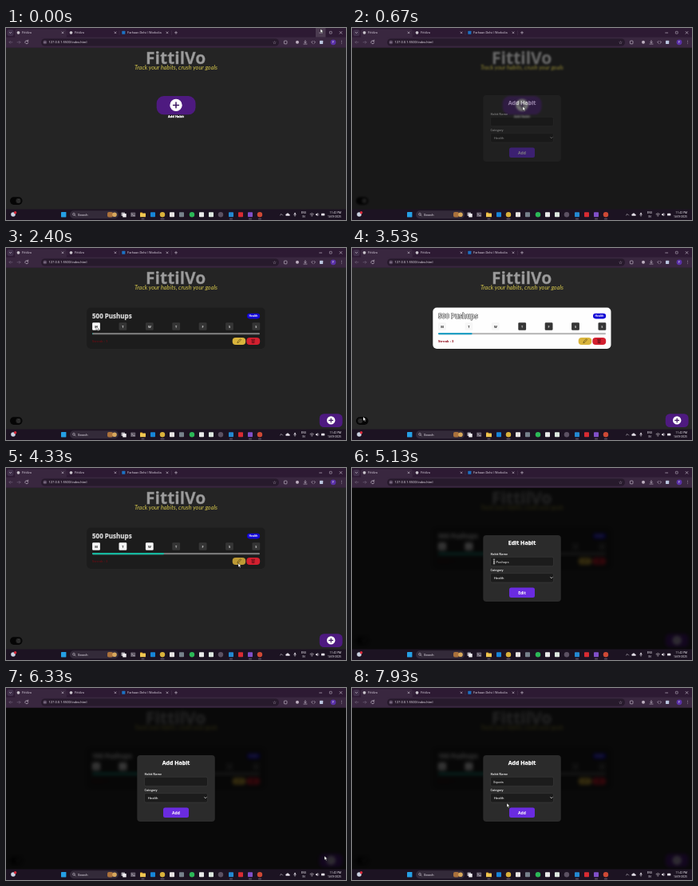
An HTML page that plays this animation: 426x240 px, repeating every 8 s.

```html
<!DOCTYPE html>
<html lang="en">
<head>
<meta charset="utf-8">
<title>Habit tracker</title>
<style>
  html, body { margin: 0; width: 100%; height: 100%; overflow: hidden; background: #242424; }
  svg { display: block; width: 100vw; height: 100vh; font-family: Roboto, "Liberation Sans", sans-serif; }
  .display { font-family: "Noto Sans", "Open Sans", sans-serif; font-weight: 900; }
  .label { font-family: "Open Sans", sans-serif; font-weight: 700; }
  .script { font-family: Lato, sans-serif; font-style: italic; }
  .line { fill: none; stroke-linecap: round; stroke-linejoin: round; }
  .mid { text-anchor: middle; }
  .heavy { stroke: #fff; stroke-width: .25px; }
</style>
</head>
<body>
<svg id="stage" viewBox="0 0 426 240" preserveAspectRatio="none"></svg>
<script>
const LOOP = 8000;
const rect = (x, y, w, h, fill, r = 0, more = '') =>
  `<rect x="${x}" y="${y}" width="${w}" height="${h}" rx="${r}" fill="${fill}" ${more}/>`;
const dot = (x, y, r, fill, more = '') => `<circle cx="${x}" cy="${y}" r="${r}" fill="${fill}" ${more}/>`;
const text = (x, y, size, fill, str, more = '') =>
  `<text x="${x}" y="${y}" font-size="${size}" fill="${fill}" ${more}>${str}</text>`;
const line = (d, color, w = 0.6, more = '') =>
  `<path class="line" d="${d}" stroke="${color}" stroke-width="${w}" ${more}/>`;
const group = (id, body, more = '') => `<g id="${id}" ${more}>${body}</g>`;
const plus = (x, y, s, color, w) => line(`M${x - s} ${y}h${2 * s}M${x} ${y - s}v${2 * s}`, color, w);
const cross = (x, y, s, color) => line(`M${x - s} ${y - s}l${2 * s} ${2 * s}M${x + s} ${y - s}l${-2 * s} ${2 * s}`, color);

function browser() {
  const pale = '#d3c9d8';
  const tab = (x, label, icon) => icon + text(x, 7.3, 4, pale, label);
  return rect(0, 0, 426, 24.5, '#2d1a33') +
    rect(0, 11.5, 426, 13, '#39273f') +
    rect(1.5, 2, 8, 8, '#40304a', 2) + line('M4.3 5.3l1.2 1.3l1.2-1.3', pale) +
    rect(11, 1.5, 65, 11, '#39273f', 2.5) +
    tab(20, 'Fittilvo', dot(15.5, 5.8, 1.9, '#c9c3cb')) + cross(71, 5.8, 1, pale) +
    tab(86, 'Fittilvo', dot(81.5, 5.8, 1.9, '#c9c3cb')) + cross(137, 5.8, 1, pale) +
    tab(152, 'Farhaan Delvi | Workolia', rect(145.3, 3.8, 4, 4, '#1b72c4', 0.4)) + cross(202, 5.8, 1, pale) +
    line('M77.5 3.5v5M142 3.5v5M207.5 3.5v5', '#4e3d57', 0.4) +
    plus(213, 5.8, 1.5, pale, 0.6) +
    group('minimize', rect(388, 0, 12.5, 11.5, '#4b3b50')) +
    line('M392.7 6h3', pale) + rect(405.4, 4.3, 2.8, 2.8, 'none', 0.3, `stroke="${pale}" stroke-width=".5"`) +
    cross(419.5, 5.8, 1.4, pale) +
    line('M8 17.8h-4m1.5-1.5l-1.5 1.5l1.5 1.5M14 17.8h4m-1.5-1.5l1.5 1.5l-1.5 1.5', '#75667c') +
    line('M27.4 16.4a2 2 0 1 0 .4 1.8M27.7 15v1.6h-1.6', pale) +
    rect(44, 13.2, 298, 9.4, '#271a2c', 4.7) + dot(48.8, 17.8, 2.6, '#403047') +
    line('M47.5 17h2.6M47.5 18.6h2.6', pale, 0.5) +
    text(53.5, 19.3, 4.1, '#ddd6e1', '127.0.0.1:5500/index.html') +
    text(336.5, 19.7, 5.5, pale, '☆', 'class="mid" font-family="DejaVu Sans, sans-serif"') +
    rect(348.4, 16, 3.6, 3.8, 'none', 0.6, `stroke="${pale}" stroke-width=".6"`) +
    dot(365, 17.8, 2, '#bcaebf') +
    line('M375 15.5v3m-1.3-1.2l1.3 1.3l1.3-1.3M373 20h4', pale) +
    line('M384.2 16.3l-1.5 1.5l1.5 1.5M386 16.3l1.5 1.5l-1.5 1.5', pale) +
    rect(393, 15.7, 4.2, 4.2, '#b9c5de', 0.6) +
    dot(410, 17.8, 3.4, '#5a31a8') + text(410, 19.1, 3.6, '#fff', 'F', 'class="mid"') +
    dot(420.5, 16, 0.45, pale) + dot(420.5, 17.8, 0.45, pale) + dot(420.5, 19.6, 0.45, pale);
}

function taskbar() {
  const pale = '#e4dfe8';
  // shape, x, colour of each pinned app
  const apps = [
    ['s', 184, '#1685d8'], ['c', 196, '#d9b13b'], ['s', 208, '#e8e3e3'], ['s', 220, '#77818c'],
    ['c', 233, '#2cb858'], ['s', 245, '#e9e9e9'], ['s', 257, '#dce8df'], ['c', 269, '#5b5162'],
    ['s', 282, '#2389d2'], ['s', 294, '#d92b32'], ['s', 306, '#8150c9'], ['c', 318, '#cf4935']
  ];
  return rect(0, 226.5, 426, 13.5, '#1c1322') +
    dot(9, 233, 2.8, '#ccd4e4') + dot(11.6, 230.8, 1.7, '#d8293b') +
    rect(69, 230, 6.4, 6.4, '#25a0e5', 0.4) +
    rect(80, 228.3, 61, 10, '#332a39', 5) + dot(85, 232.8, 1.4, 'none', `stroke="${pale}" stroke-width=".5"`) +
    line('M86 233.8l1.2 1.2', pale, 0.5) + text(90, 234.8, 4.1, pale, 'Search') +
    rect(127, 230, 7, 6.5, '#aa713c', 2) + dot(136, 233.2, 2.8, '#d7a85d') +
    rect(144.5, 230.5, 4.5, 4.5, '#a9a5ad', 0.5) + rect(146.2, 232, 4.5, 4.5, '#efedf0', 0.5) +
    rect(156.2, 230.5, 6, 5.6, '#625a68', 0.7) + line('M157.4 232l1.2 1l-1.2 1M159.4 234.6h1.8', pale, 0.5) +
    rect(168, 230.5, 3, 2, '#d99a25', 0.5) + rect(168, 231.5, 7, 4.8, '#f0c651', 0.6) +
    apps.map(([shape, x, color]) => shape === 'c'
      ? dot(x, 233.2, 3.2, color) : rect(x - 3, 230.2, 6, 6, color, 0.8)).join('') +
    line('M170 238.7h3M194 238.7h4M280.5 238.7h3M304.5 238.7h3M316.5 238.7h3', '#a997b5', 0.6) +
    line('M343.5 234l1.5-1.5l1.5 1.5', pale) +
    `<path d="M351 234.8a1.2 1.2 0 0 1 .3-2.3a1.8 1.8 0 0 1 3.3.3a1 1 0 0 1 .3 2z" fill="${pale}"/>` +
    rect(361.3, 230.7, 1.5, 3, pale, 0.7) + line('M360.5 233a1.5 1.5 0 0 0 3 0M362 234.6v1', pale, 0.4) +
    text(373, 232.1, 3.3, pale, 'ENG', 'class="mid"') + text(373, 236.6, 3.3, pale, 'IN', 'class="mid"') +
    line('M381 232.5q2.2-2 4.4 0M382 233.8q1.2-1 2.4 0', pale) + dot(383.2, 235, 0.5, pale) +
    `<path d="M388 232.4h1l1.5-1.3v4.2l-1.5-1.3h-1z" fill="${pale}"/>` + line('M391.5 232q1 1.2 0 2.4', pale, 0.4) +
    rect(395, 231.8, 4.3, 2.8, pale, 0.6) +
    text(420, 232.1, 3.4, pale, '11:42 PM', 'text-anchor="end"') +
    text(420, 236.8, 3.4, pale, '14-09-2025', 'text-anchor="end"');
}

const dayX = i => 113 + i * 33.4;

function card() {
  const days = [...'MTWTFSS'].map((d, i) =>
    rect(dayX(i) - 4.9, 93.3, 9.8, 9.4, '#353535', 1.3, `id="day${i}"`) +
    text(dayX(i), 99.5, 3.9, '#ddd', d, `id="letter${i}" class="display mid"`)).join('');
  return rect(101.3, 74.6, 223.2, 51.4, '#1c1c1c', 5, 'id="cardBack"') +
    text(108, 88.1, 8, '#e2e2e2', '', 'id="habit" class="display" stroke="#444" stroke-width=".9" paint-order="stroke"') +
    rect(302, 81.8, 16.2, 6.6, '#1206d6', 3.3) + text(310, 86.3, 3.3, '#fff', 'Health', 'class="display mid"') +
    days + rect(108, 106.1, 210, 2.2, '#777', 1.1, 'id="track"') + rect(108, 106.1, 0, 2.2, '#16b79f', 1.1, 'id="progress"') +
    text(108, 118, 4.2, '#5a1015', '', 'id="streak" class="display"') +
    rect(283.7, 112, 16.5, 9, '#d9b43c', 4, 'id="editButton"') + line('M290 118.3l.5-1.6l3-3l1.1 1.1l-3 3z', '#47360c') +
    rect(301.3, 112, 16.9, 9, '#d3202f', 4) + line('M307.6 114.3h4M308.2 115v3.6h2.8v-3.6M309.6 115.5v2.4', '#420910');
}

function page() {
  return rect(-10, 20, 446, 215, '#242424', 0, 'id="pageBack"') +
    text(212.7, 44.6, 21, '#9c9c9c', 'FittilVo', 'id="heading" class="display mid" stroke="#777" stroke-width=".35"') +
    text(213, 51.7, 7.35, '#d5c64b', 'Track your habits, crush your goals', 'id="tagline" class="script mid"') +
    group('starter', rect(188.7, 85, 48.8, 23.3, '#4e1a80', 9) + dot(213, 96.4, 7.7, '#fff') +
      plus(213, 96.4, 3.4, '#3a1560', 1.5) + text(213, 112.4, 4, '#fff', 'Add Habit', 'class="display heavy mid"')) +
    group('card', card() + rect(392.8, 207.2, 28.8, 16.8, '#4e1a80', 5.5) + dot(407.2, 215.4, 5.2, '#fff') +
      plus(407.2, 215.4, 2.4, '#3a1560', 1.2)) +
    rect(5, 211.3, 15.5, 9.6, '#050505', 4.8) +
    group('knob', dot(0, 216, 3.2, '#222') + line('M.8 214.3a1.8 1.8 0 1 0 1 2.6a1.8 1.8 0 0 1-1-2.6', '#555', 0.4));
}

function dialog() {
  return rect(164.3, 84, 97.5, 83, '#2b2b2b', 4) +
    text(213, 96.4, 7, '#fff', '', 'id="dialogTitle" class="display heavy mid"') +
    text(173.5, 108.5, 3.6, '#ddd', 'Habit Name', 'class="label"') +
    rect(173.5, 111.3, 79, 11.4, '#1c1c1c', 2, 'id="field" stroke="#414141" stroke-width=".5"') +
    text(177, 118.5, 4.2, '#eee', '', 'id="fieldText"') +
    text(173.5, 128.5, 3.6, '#ddd', 'Category', 'class="label"') +
    rect(173.5, 131.6, 79, 11.4, '#1c1c1c', 2, 'stroke="#414141" stroke-width=".5"') +
    text(177.7, 138.9, 4.4, '#fff', 'Health') + line('M248.7 136.6l1.2 1.2l1.2-1.2', '#fff', 0.7) +
    rect(197, 149.6, 32, 12.4, '#6a2be0', 2.5) + text(213, 157.6, 5, '#fff', '', 'id="submit" class="label mid"') +
    group('suggestion', rect(202, 125.8, 41.5, 11.4, '#232326', 1.2) +
      rect(202, 128, 41.5, 7, '#303034') + text(204.5, 132.8, 3.7, '#eee', '500 Pushups') + cross(238.5, 131.4, 0.8, '#bbb'));
}

document.getElementById('stage').innerHTML =
  group('page', page()) + rect(0, 24, 426, 203, '#000', 0, 'id="shade"') + group('dialog', dialog()) +
  browser() + taskbar() +
  group('pointer', group('arrow', '<path d="M0 0v5l1.2-1.1l.9 1.9l.9-.4l-.9-1.8h1.6z" fill="#fff" stroke="#000" stroke-width=".35"/>') +
    group('beam', line('M-.8-2.8h1.6M0-2.8v5.6M-.8 2.8h1.6', '#eee', 0.6)));

const $ = id => document.getElementById(id);
const set = (id, attrs) => Object.entries(attrs).forEach(([k, v]) => $(id).setAttribute(k, v));
const show = (id, on) => set(id, { visibility: on ? 'visible' : 'hidden' });
const write = (id, str) => { if ($(id).textContent !== str) $(id).textContent = str; };
const ramp = (t, start, length) => Math.min(1, Math.max(0, (t - start) / length));
const ease = p => p * p * (3 - 2 * p);
const between = (t, a, b) => t >= a && t < b;
const gray = (a, b, p) => { const v = Math.round(a + (b - a) * p); return `rgb(${v},${v},${v})`; };

const ADDED = 2200, LIGHT = 3200, DARK = 3460;
const CHECKS = [2390, 2590, 2790];
const DIALOGS = [[640, 2180], [4400, 5800], [6260, 9000]];
const PATH = [
  [0, 394, 1], [130, 394, 2], [500, 214, 98], [660, 214, 98], [950, 206, 117], [1250, 206, 117],
  [1600, 220, 134], [1780, 220, 134], [2050, 213, 156], [2190, 213, 156], [2350, 113, 98],
  [2420, 113, 98], [2540, 146, 98], [2610, 146, 98], [2740, 180, 98], [2820, 180, 98],
  [3130, 14, 212], [3560, 14, 211], [4180, 291, 119], [4420, 291, 119], [4750, 178, 117],
  [5350, 178, 117], [5650, 213, 156], [5810, 213, 156], [6180, 398, 210], [6350, 399, 210],
  [6700, 206, 117], [7500, 206, 117], [7850, 194, 144], [8000, 194, 144]
];

function pointerAt(t) {
  const i = PATH.findIndex(p => p[0] > t);
  const [a, b] = [PATH[i - 1], PATH[i]];
  const p = ease((t - a[0]) / (b[0] - a[0]));
  return [a[1] + (b[1] - a[1]) * p, a[2] + (b[2] - a[2]) * p];
}

function fieldAt(t) {
  if (t < 4000) return t < 1500 ? '' : '500 Pushups';
  if (t < 6100) {
    const lead = t < 4950 ? '500' : t < 5070 ? '50' : t < 5230 ? '0' : t < 5330 ? '10' : '100';
    return lead + ' Pushups';
  }
  return 'Squats'.slice(0, Math.max(0, Math.floor((t - 6800) / 110)));
}

function draw(t) {
  const light = between(t, LIGHT, DARK);
  const lightCard = between(t, LIGHT, 3620);
  set('pageBack', { fill: t < DARK ? (light ? '#f1f1f1' : '#242424') : gray(241, 36, ramp(t, DARK, 72)) });
  set('tagline', { fill: light ? '#9a8a20' : '#d5c64b' });
  show('minimize', t < 180);
  show('starter', t < ADDED);
  show('card', t >= ADDED);

  const knob = t < DARK ? ramp(t, LIGHT, 80) : 1 - ramp(t, 3540, 90);
  set('knob', { transform: `translate(${15.5 - 5.2 * knob} 0)` });
  const cardFill = light ? '#fff' : t < DARK ? '#1c1c1c' : gray(255, 28, ramp(t, 3530, 170));
  set('cardBack', { fill: cardFill });
  set('streak', { fill: lightCard ? '#8b0010' : '#5a1015' });
  set('track', { fill: lightCard ? '#bbb' : '#777' });
  set('progress', { fill: lightCard ? '#22a0c4' : '#16b79f' });
  set('editButton', { fill: between(t, 4120, 4500) ? '#bd9a35' : '#d9b43c' });

  let done = CHECKS.reduce((sum, c) => sum + ease(ramp(t, c, 130)), 0);
  if (t > DARK) done *= ramp(t, DARK, 150);
  set('progress', { width: done * 30 });
  const count = CHECKS.filter(c => t >= c).length;
  CHECKS.forEach((c, i) => {
    set('day' + i, { fill: t >= c ? '#f6f6f6' : '#353535' });
    set('letter' + i, { fill: t >= c ? '#222' : '#ddd' });
  });
  write('streak', 'Streak : ' + count);
  write('habit', t < 5800 ? '500 Pushups' : '100 Pushups');

  const open = Math.max(...DIALOGS.map(([a, b]) => Math.min(ramp(t, a, 70), 1 - ramp(t, b, 70))));
  show('shade', open > 0);
  show('dialog', open > 0);
  set('shade', { opacity: 0.76 * open });
  set('dialog', { opacity: open });
  $('page').style.filter = open ? `blur(${2 * open}px)` : 'none';

  const verb = between(t, 4300, 6100) ? 'Edit' : 'Add';
  const preview = between(t, 1500, 1780);
  write('dialogTitle', verb + ' Habit');
  write('submit', verb);
  write('fieldText', fieldAt(t));
  set('field', { fill: preview ? '#c3d2df' : '#1c1c1c' });
  set('fieldText', { fill: preview ? '#333' : '#eee', 'font-size': preview ? 3.9 : 4.2 });
  show('suggestion', between(t, 1080, 1780));

  const [x, y] = pointerAt(t);
  const typing = open === 1 && between(x, 173, 253) && between(y, 111, 123);
  set('pointer', { transform: `translate(${x} ${y})` });
  show('arrow', !typing);
  show('beam', typing);
}

const start = performance.now();
function tick() {
  draw((performance.now() - start) % LOOP);
  requestAnimationFrame(tick);
}
tick();
</script>
</body>
</html>
```
